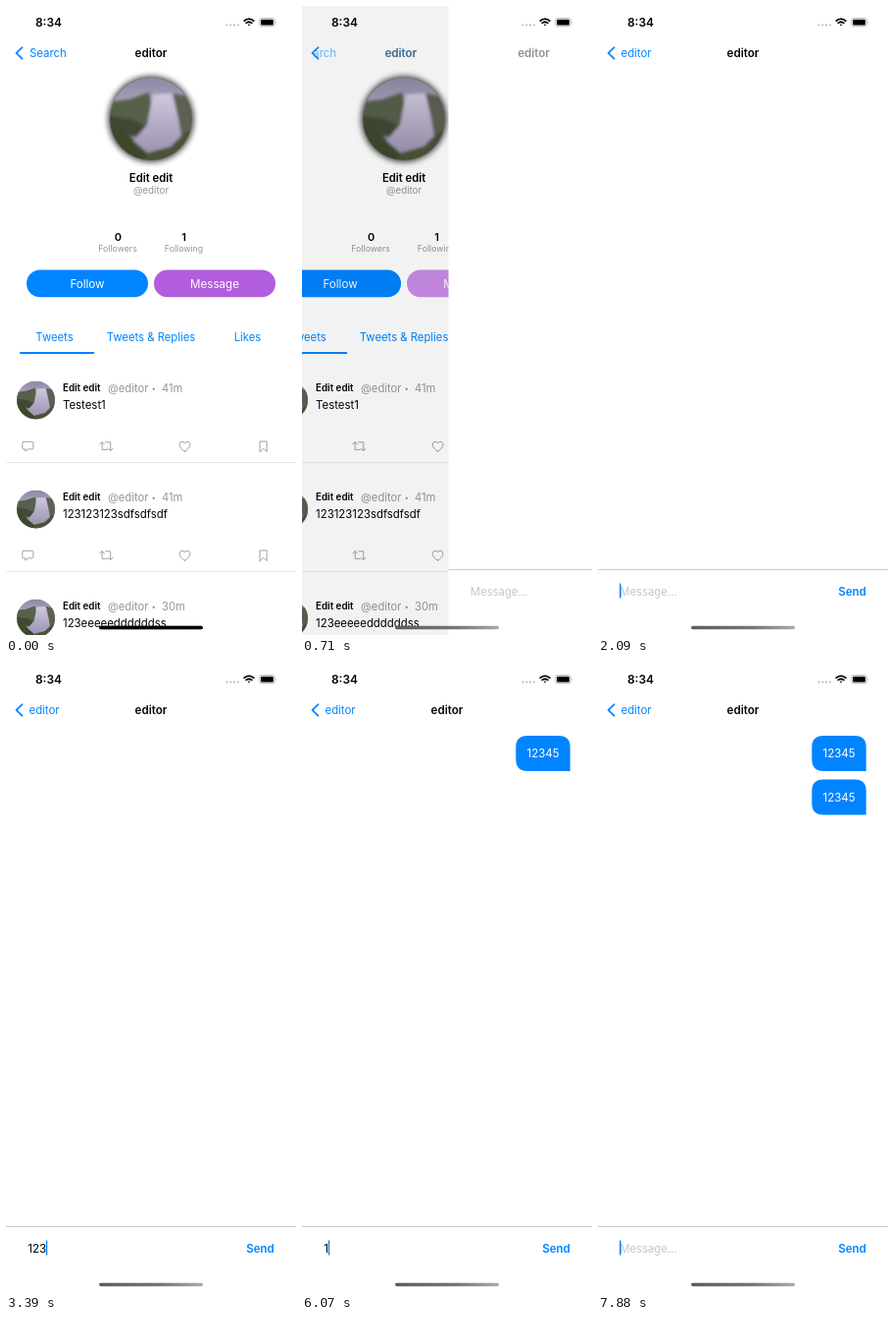
An HTML page for the animation above (8000 ms loop, 296x640 px).

```html
<!DOCTYPE html>
<html lang="en">
<head>
<meta charset="utf-8">
<title>Chat demo</title>
<style>
html, body { margin: 0; width: 100%; height: 100%; overflow: hidden; background: #fff; }
svg { display: block; font: 11.6px Inter, "Liberation Sans", sans-serif; }
.semi { font-weight: 600; }
.icon { fill: none; stroke: #969696; stroke-width: .9; stroke-linejoin: round; stroke-linecap: round; }
</style>
</head>
<body>
<svg id="stage" width="296" height="640" viewBox="0 0 296 640"></svg>
<script>
const BLUE = '#0084ff', GRAY = '#96969a';
const USER = 'editor', NAME = 'Edit edit';

const text = (x, y, str, { size = 11.6, fill = '#000', mid = false, semi = false, id = '' } = {}) =>
  `<text x="${x}" y="${y}" font-size="${size}" fill="${fill}" text-anchor="${mid ? 'middle' : 'start'}"` +
  `${semi ? ' class="semi"' : ''}${id ? ` id="${id}"` : ''}>${str}</text>`;

const photo = (x, y, r) => `<use href="#photo" transform="translate(${x} ${y}) scale(${r / 42})"/>`;

const button = (x, label, fill, id) => `<g id="${id}">
  <rect x="${x}" y="268.5" width="124" height="27.8" rx="13.9" fill="${fill}"/>
  ${text(x + 62, 286.6, label, { fill: '#fff', mid: true })}</g>`;

const post = (y, age, body) => `<g transform="translate(0 ${y})">
  ${photo(30.5, 401, 19.5)}
  ${text(58, 392, NAME, { size: 9.8, semi: true })}
  ${text(104, 392.5, '@' + USER, { size: 11.2, fill: GRAY })}
  ${text(148.5, 392, '•', { size: 8, fill: GRAY })}
  ${text(159, 392.5, age, { size: 11.2, fill: GRAY })}
  ${text(58, 410, body, { size: 11.4 })}
  <g class="icon">
    <path d="M18 443.3h8.6q1.2 0 1.2 1.2v5.2q0 1.2-1.2 1.2h-4.4l-2.4 2.3v-2.3h-1.8q-1.2 0-1.2-1.2v-5.2q0-1.2 1.2-1.2z"/>
    <path d="M95.8 446l2.3-2.4 2.3 2.4M98.1 443.8v7.6h5.4M101.7 443.8h5v8.6M104.3 450.2l2.4 2.4 2.3-2.4"/>
    <path d="M182.5 453.2c-8-4.8-5.6-9.9-2.5-9.9q1.7 0 2.5 1.7q.8-1.7 2.5-1.7c3.1 0 5.5 5.1-2.5 9.9z"/>
    <path d="M259.4 443h6.8v10.6l-3.4-3.3-3.4 3.3z"/>
  </g>
  <path d="M0 464.5H296" stroke="#e4e4e4" stroke-width=".8"/></g>`;

const bubble = (id, y) => `<g id="${id}" transform="translate(0 ${y})">
  <path d="M230 0h32q11.7 0 11.7 11.7V36H230q-11.7 0-11.7-11.7V11.7Q218.3 0 230 0z" fill="${BLUE}"/>
  ${text(246, 22.3, '12345', { size: 11.5, fill: '#fff', mid: true })}</g>`;

stage.innerHTML = `
<defs>
  <linearGradient id="sky" x2="0" y2="1">
    <stop offset="0" stop-color="#8f88a4"/><stop offset=".25" stop-color="#a39cb6"/>
    <stop offset="1" stop-color="#7d7590"/>
  </linearGradient>
  <linearGradient id="fall" x2="0" y2="1">
    <stop offset="0" stop-color="#cfc8de"/><stop offset="1" stop-color="#9c93b0"/>
  </linearGradient>
  <linearGradient id="bar">
    <stop offset="0" stop-color="#5c5c5c"/><stop offset=".6" stop-color="#777"/><stop offset="1" stop-color="#aaa"/>
  </linearGradient>
  <filter id="soft" x="-30%" y="-30%" width="160%" height="160%"><feGaussianBlur stdDeviation="1.6"/></filter>
  <filter id="glow" x="-30%" y="-30%" width="160%" height="160%"><feGaussianBlur stdDeviation="3"/></filter>
  <clipPath id="disc"><circle r="42"/></clipPath>
  <clipPath id="backArea"><rect x="11.5" y="36" width="285" height="24"/></clipPath>
  <g id="photo" clip-path="url(#disc)">
    <rect x="-42" y="-42" width="84" height="84" fill="url(#sky)"/>
    <g filter="url(#soft)">
      <path d="M-45-17L-22-20-2-27 2-8-3 10-24 12-45 4z" fill="#56604a"/>
      <path d="M-45-4L-20 0-6 6-12 18-45 14z" fill="#414a36"/>
      <path d="M2-25L20-26 28-20 30 4 34 28-4 34-18 22-4 6z" fill="url(#fall)"/>
      <path d="M22-26L45-22V28L32 24 28 0z" fill="#5f6053"/>
      <path d="M-45 4L-28 10-16 24-2 36-4 45H-45z" fill="#3a4a2c"/>
      <path d="M-12 45L-2 34 20 28 34 14 45 10V45z" fill="#4c5238"/>
    </g>
  </g>
</defs>
<rect width="296" height="640" fill="#fff"/>
<g id="profile">
  <circle cx="148" cy="115" r="43.5" opacity=".8" filter="url(#glow)"/>
  ${photo(148, 115, 42)}
  ${text(148, 178.8, NAME, { size: 11.3, mid: true, semi: true })}
  ${text(148, 191, '@' + USER, { size: 9.8, fill: GRAY, mid: true })}
  ${text(114.5, 238.6, '0', { size: 11, mid: true, semi: true })}
  ${text(114, 250, 'Followers', { size: 8.8, fill: GRAY, mid: true })}
  ${text(181.5, 238.6, '1', { size: 11, mid: true, semi: true })}
  ${text(181.5, 250, 'Following', { size: 8.8, fill: GRAY, mid: true })}
  ${button(21, 'Follow', BLUE, 'follow')}
  ${button(151, 'Message', '#b25cde', 'message')}
  ${text(49.5, 341, 'Tweets', { size: 11.3, fill: BLUE, mid: true })}
  ${text(148, 341, 'Tweets &amp; Replies', { size: 11.3, fill: BLUE, mid: true })}
  ${text(246.5, 341, 'Likes', { size: 11.3, fill: BLUE, mid: true })}
  <rect x="14" y="352" width="76" height="2" fill="${BLUE}"/>
  ${post(0, '41m', 'Testest1')}
  ${post(111, '41m', '123123123sdfsdfsdf')}
  ${post(222, '30m', '123eeeeeddddddss')}
</g>
<rect id="shade" width="296" height="640"/>
<g id="chat">
  <rect width="296" height="640" fill="#fff"/>
  ${bubble('sent1', 74)}
  ${bubble('sent2', 118.5)}
  <path d="M0 573.5H296" stroke="#c6c6c8" stroke-width=".9"/>
  ${text(22.3, 599.5, 'Message...', { size: 11.3, fill: '#c7c7cb', id: 'hint' })}
  ${text(22.3, 599.5, '', { size: 11.5, id: 'draft' })}
  <rect id="caret" y="587.5" width="1.4" height="15" fill="${BLUE}"/>
  ${text(259.5, 599.5, 'Send', { fill: BLUE, mid: true, semi: true, id: 'send' })}
</g>
<g clip-path="url(#backArea)">
  ${text(24, 51.8, 'Search', { size: 11.4, fill: BLUE, id: 'oldBack' })}
  ${text(0, 51.8, USER, { mid: true, semi: true, id: 'oldTitle' })}
  ${text(0, 51.8, USER, { size: 11.3, fill: BLUE, mid: true, id: 'back' })}
  ${text(0, 51.8, USER, { mid: true, semi: true, id: 'newTitle' })}
</g>
<path d="M16.5 42.2L10.5 47.9 16.5 53.6" fill="none" stroke="${BLUE}" stroke-width="1.8" stroke-linecap="round" stroke-linejoin="round"/>
${text(30, 21, '8:34', { size: 11.9, semi: true })}
<g fill="#c4c4c6">${[225.5, 229.3, 233.1, 236.9].map(x => `<circle cx="${x}" cy="19.4" r="1.1"/>`).join('')}</g>
<g fill="none" stroke="#000" stroke-width="1.7">
  <path d="M242.6 15.5q5.400-4.800 10.800 0M244.6 17.7q3.400-2.900 6.800 0"/>
  <path d="M246.700 18.900q1.300-.9 2.600 0L248 20.300z" fill="#000" stroke="none"/>
</g>
<rect x="258.7" y="12.5" width="15.6" height="8.2" rx="2.3" fill="none" stroke="#a5a5a5" stroke-width=".8"/>
<rect x="260" y="13.8" width="13" height="5.6" rx="1.2"/>
<path d="M275.6 15.3q1.3 1.3 0 2.6z" fill="#a5a5a5"/>
<rect x="95" y="630.7" width="106" height="3.6" rx="1.8" fill="url(#bar)"/>
<rect id="darkBar" x="95" y="630.7" width="106" height="3.6" rx="1.8"/>`;

const el = id => document.getElementById(id);
const set = (id, attrs) => { for (const k in attrs) el(id).setAttribute(k, attrs[k]); };

// Value of the last [time, value] step that has been reached
const step = (t, steps) => steps.reduce((v, [at, next]) => t >= at ? next : v, steps[0][1]);

const ticks = [0, 500, 600, 710, 810, 910, 1010, 1130].map(t => [t, t]);
const messageAlpha = [[0, 1], [500, .6], [600, .4], [710, .7], [810, 1]];
const sendAlpha = [[0, 1], ...[4380, 7240].flatMap(t =>
  [[t, .5], [t + 110, .2], [t + 330, .5], [t + 440, .8], [t + 550, 1]])];
const typed = [[0, 0], [2720, 1], [3180, 2], [3390, 3], [3760, 4], [4070, 5], [4600, 0],
  [6070, 1], [6290, 2], [6480, 3], [6970, 5], [7560, 0]];
const caretOn = [[0, 0], [2090, 1], [5180, 0], [5560, 1]];

// Critically damped spring: share of the push still to go
function remaining(t) {
  const w = Math.max(0, t - 619) * .01826;
  return t >= 1130 ? 0 : (1 + w) * Math.exp(-w);
}

function draw(t) {
  const left = remaining(step(t, ticks));
  const nav = left + .25 * left * (1 - left);
  set('profile', { transform: `translate(${-88.8 * (1 - left)} 0)` });
  set('shade', { opacity: .1 * (1 - left) });
  set('chat', { transform: `translate(${296 * left} 0)` });
  set('message', { opacity: step(t, messageAlpha) });

  set('oldBack', { x: 24 - 62 * (1 - nav), opacity: nav });
  const titleX = 148 - 109 * (1 - nav);
  set('oldTitle', { x: titleX, opacity: nav });
  set('back', { x: titleX, opacity: 1 - nav });
  set('newTitle', { x: 148 + 156 * nav, opacity: 1 - nav });
  set('darkBar', { opacity: Math.max(0, 2 * left - 1) });

  const count = step(t, typed);
  el('draft').textContent = '12345'.slice(0, count);
  set('hint', { opacity: count ? 0 : 1 });
  set('caret', { x: count ? 19.8 + 7 * count : 22, opacity: step(t, caretOn) });
  set('send', { opacity: step(t, sendAlpha) });
  set('sent1', { opacity: t >= 4600 ? 1 : 0 });
  set('sent2', { opacity: t >= 7560 ? 1 : 0 });
}

const start = performance.now();
function frame() {
  draw((performance.now() - start) % 8000);
  requestAnimationFrame(frame);
}
frame();
</script>
</body>
</html>
```
